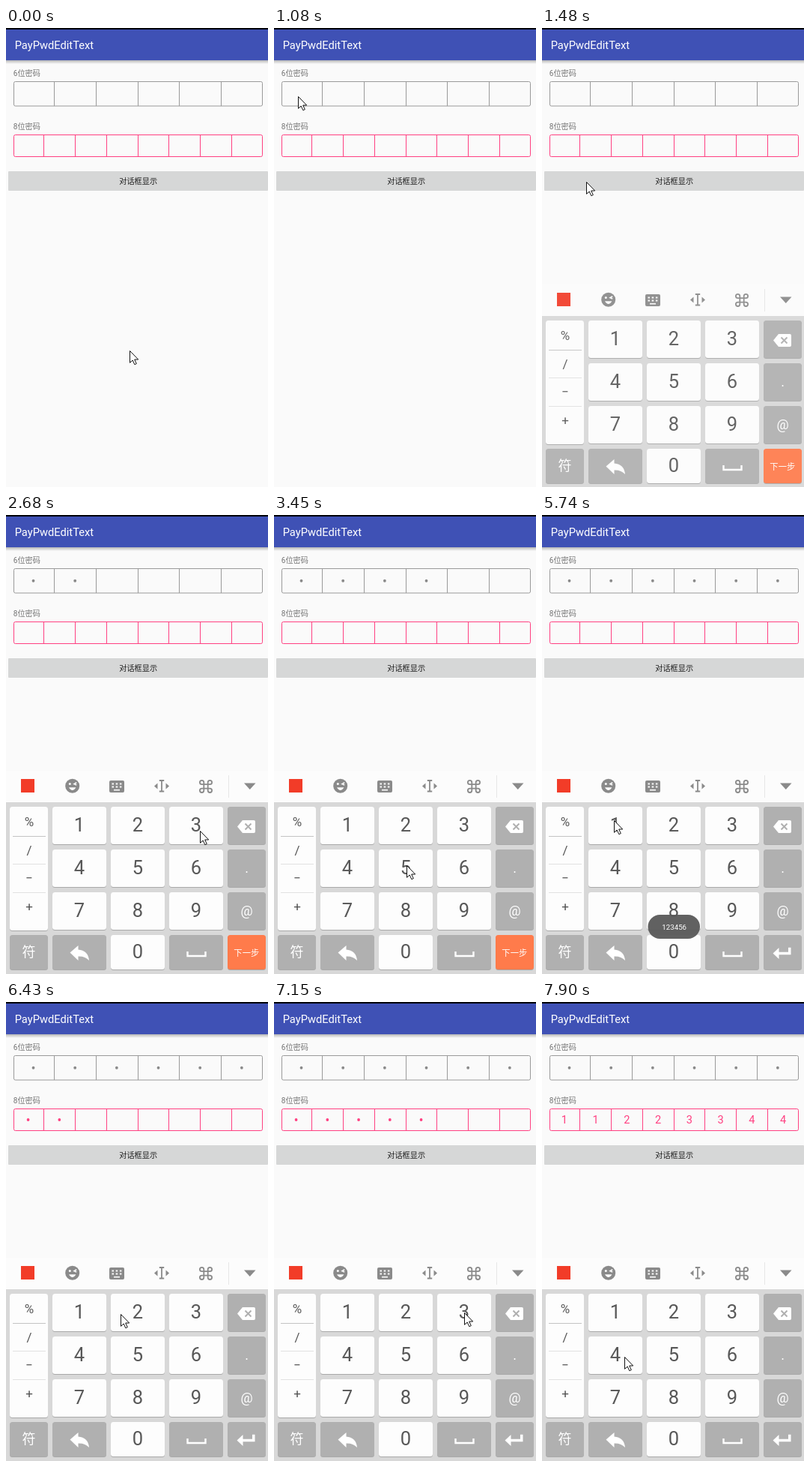
An HTML page that plays this animation: 350 px wide and 612 px high, repeating every 7990 ms.

```html
<!DOCTYPE html>
<html lang="zh">
<head>
<meta charset="utf-8">
<title>PayPwdEditText</title>
<style>
html, body { margin: 0; width: 100%; height: 100%; overflow: hidden; background: #fafafa; }
svg { display: block; width: 350px; height: 612px; }
text { font-family: Roboto, "Noto Sans CJK SC", "Noto Sans CJK", sans-serif; }
.mid { text-anchor: middle; }
.label { font-size: 10.2px; fill: #757575; }
.num { fill: #585858; }
.sym { font-size: 17px; fill: #555; }
.white { fill: #fff; }
.icon { fill: #8a8a8a; }
</style>
</head>
<body>
<svg viewBox="0 0 350 612">
  <defs>
    <linearGradient id="shade" x2="0" y2="1">
      <stop offset="0" stop-color="#000" stop-opacity=".27"/>
      <stop offset="1" stop-color="#000" stop-opacity="0"/>
    </linearGradient>
  </defs>
  <rect width="350" height="612" fill="#fafafa"/>
  <rect y="43" width="350" height="5" fill="url(#shade)"/>
  <rect width="350" height="43" fill="#3f51b5"/>
  <rect width="350" height="2" fill="#000"/>
  <text x="11.7" y="28" font-size="14.7" class="white">PayPwdEditText</text>
  <text x="9.7" y="64.3" class="label">6位密码</text>
  <text x="9.7" y="135.3" class="label">8位密码</text>
  <g id="fields"></g>
  <rect x="3" y="191" width="347" height="26" rx="1" fill="#d6d7d7"/>
  <text x="176.7" y="208" class="mid" font-size="10.2" fill="#1c1c1c">对话框显示</text>

  <g id="board">
    <rect y="341" width="350" height="42" fill="#fcfcfc"/>
    <rect y="383" width="350" height="229" fill="#d8d8d8"/>
    <rect x="20" y="352" width="18" height="18" fill="#f23c28"/>
    <g class="icon">
      <circle cx="88.7" cy="361.3" r="9.5"/>
      <path d="M138 356q0-2 2-2h16q2 0 2 2v12q0 2-2 2h-16q-2 0-2-2z"/>
      <path d="M202.500 357.500v8l-4.500-4zM213.500 357.500v8l4.500-4z"/>
      <path d="M318 357.500h15.500l-7.750 8.500z"/>
    </g>
    <g fill="none" stroke="#fcfcfc" stroke-width="1.6">
      <path d="M84 363.300q4.700 7.500 9.400 0z" fill="#fcfcfc" stroke="none"/>
      <circle cx="85.300" cy="358.600" r="1.500" fill="#fcfcfc" stroke="none"/>
      <path d="M94.200 356.800l-3.200 1.800 3.200 1.400"/>
      <path d="M141.500 358.500h13M141.500 362.500h13" stroke-width="2.200" stroke-dasharray="2.500 2.700"/>
      <path d="M144 366.700h8"/>
    </g>
    <g fill="none" stroke="#8a8a8a" stroke-width="1.8">
      <path d="M204.800 354h6.400M204.800 368.500h6.400M208 354v14.500"/>
      <path d="M264.300 359.200h5.400v5.400h-5.400zM264.300 359.200h-2.700a2.700 2.700 0 1 1 2.700-2.700zM269.700 359.200v-2.700a2.700 2.700 0 1 1 2.700 2.700zM269.700 364.600h2.700a2.700 2.700 0 1 1-2.700 2.700zM264.300 364.600v2.700a2.700 2.700 0 1 1-2.700-2.700z"/>
    </g>
    <path d="M297.500 347v30" stroke="#e6e6e6"/>
    <g id="keys"></g>
    <path d="M9 428.500h44" stroke="#c4c4c4"/>
    <path d="M9 465.500h44M9 503.500h44" stroke="#e2e2e2"/>
    <path d="M85.500 583.500l11-9.500v5.600q13 .8 14.500 14.400q-5-6-14.500-5.600v5.600z" fill="#fff"/>
    <path d="M242.500 582v6h24v-6" fill="none" stroke="#fff" stroke-width="2.400"/>
    <path d="M309 415.500l7-8.500h15q2 0 2 2v13q0 2-2 2h-15z" fill="#fff"/>
    <path d="M319.500 411.500l8 8m0-8l-8 8" stroke="#b0b0b0" stroke-width="2"/>
    <text id="next" x="321.300" y="587.700" class="mid white" font-size="11.300">下一步</text>
    <path id="enter" d="M308.500 584.500l8-7.500v5.800h12.500v-6h3.500v9.500h-16v5.700z" fill="#fff"/>
  </g>

  <g id="toast">
    <rect x="141.500" y="533" width="69.500" height="32" rx="16" fill="#595959" fill-opacity=".95"/>
    <text x="176.700" y="553" class="mid white" font-size="9.700">123456</text>
  </g>
  <path id="pointer" d="M.5.5V16.300l3.700-3.300 2.600 5.700 2.500-1.100-2.600-5.600h5z" fill="#fff" stroke="#111"/>
</svg>

<script>
const LOOP = 7990, STEP = 70;
const KEYBOARD_IN = 1390, SECOND_FIELD = 5260, REVEAL = 7900;
const GREY = '#b0b0b0', WHITE = '#fdfdfd', ORANGE = '#ff7b4b', PINK = '#ff4081';
const $ = id => document.getElementById(id);
const clamp = v => Math.max(0, Math.min(1, v));
const show = (el, alpha) => el.setAttribute('opacity', Number(alpha));

function add(parent, tag, attrs, text) {
  const el = document.createElementNS('http://www.w3.org/2000/svg', tag);
  for (const k in attrs) el.setAttribute(k, attrs[k]);
  if (text) el.textContent = text;
  return parent.appendChild(el);
}

// Password field: returns the dot and digit of each cell
function field(count, top, height, line, ink) {
  const g = $('fields'), w = 334 / count, mid = top + height / 2;
  add(g, 'rect', { x: 10.5, y: top, width: 332, height, rx: 2, fill: 'none', stroke: line });
  return Array.from({ length: count }, (_, i) => {
    if (i) add(g, 'path', { d: `M${Math.floor(9 + w * i) + .5} ${top}v${height}`, stroke: line });
    const x = 8.7 + w * (i + .5);
    return {
      dot: add(g, 'circle', { cx: x, cy: mid, r: 1.9, fill: ink }),
      digit: add(g, 'text', { x: x + .3, y: mid + 5.2, class: 'mid', 'font-size': 14.6, fill: ink })
    };
  });
}

const colX = col => col ? 78 * col - 16 : 5;
const rowY = row => 389 + 57 * row;

function key(col, row, fill, label, cls = 'white', size = 18, height = row === 3 ? 46 : 50) {
  const x = colX(col), y = rowY(row), width = col % 4 ? 72 : 51, rx = 3.5;
  add($('keys'), 'rect', { x, y: y + 1, width, height, rx, fill: '#a9a9a9' });
  const face = add($('keys'), 'rect', { x, y, width, height, rx, fill });
  if (label) add($('keys'), 'text', {
    x: x + width / 2, y: y + height / 2 + size * .33, class: 'mid ' + cls, 'font-size': size
  }, label);
  return face;
}

const place = n => [1 + (n - 1) % 3, Math.floor((n - 1) / 3)];
const faces = {};
for (let n = 1; n <= 9; n++) faces[n] = key(...place(n), WHITE, String(n), 'num', 25.5);
key(2, 3, WHITE, '0', 'num', 25.5);
key(0, 0, WHITE, '', '', 0, 165);
[...'%/−+'].forEach((s, i) => add($('keys'), 'text', { x: 31, y: 415 + 37.5 * i, class: 'mid sym' }, s));
['', '.', '@'].forEach((s, row) => key(4, row, GREY, s));
key(0, 3, GREY, '符');
key(1, 3, GREY);
key(3, 3, GREY);
const action = key(4, 3, GREY);

const six = field(6, 71.5, 32.5, '#9a9a9a', '#8a8a8a');
const eight = field(8, 142.5, 29, PINK, PINK);
eight.forEach((cell, i) => cell.digit.textContent = 1 + Math.floor(i / 2));

// A number key is tapped when the pointer leaves it, twice in the second field
const moves = [], taps = [];
let spot = { x: 165, y: 430 };

function go(start, end, to) {
  if (spot.key) {
    if (start > SECOND_FIELD) taps.push({ at: start - 2 * STEP, key: spot.key });
    taps.push({ at: start, key: spot.key });
  }
  moves.push({ start, end, from: spot, to });
  spot = to;
}

const at = (x, y) => ({ x, y });
function over(n, dx = 0, dy = 0) {
  const [col, row] = place(n);
  return { x: colX(col) + 36 + dx, y: rowY(row) + 25 + dy, key: n };
}

go(120, 180, at(152, 409));
go(450, 1140, at(31, 89));
go(KEYBOARD_IN, 2080, over(1, 12));
go(2200, 2320, over(2));
go(2530, 2680, over(3, 5, 7));
go(2760, 3120, over(4));
go(3300, 3450, over(5, 1, -4));
go(3610, 3950, over(6));
go(4200, 4720, at(130, 186));
go(4790, 5050, at(40, 160));
go(SECOND_FIELD, 5860, over(1));
go(6170, 6430, over(2, -23, 2));
go(6750, 6880, over(3));
go(7210, 7510, over(4, 12, 2));
go(7810, REVEAL, spot);

const sixTaps = taps.slice(0, 6), eightTaps = taps.slice(6);
const toastIn = sixTaps[5].at + STEP, toastOut = toastIn + 2000;

// Eased pointer travel, advancing in even steps
function pointerAt(t) {
  const m = moves.filter(m => t >= m.start).pop();
  if (!m) return moves[0].from;
  const n = Math.round((m.end - m.start) / STEP);
  const p = clamp((Math.floor((t - m.start) / (m.end - m.start) * n + 1e-6) + 1) / (n + 1));
  const k = 1 - (1 - p) ** 2.2;
  return at(m.from.x + (m.to.x - m.from.x) * k, m.from.y + (m.to.y - m.from.y) * k);
}

function draw(t) {
  const { x, y } = pointerAt(t);
  $('pointer').setAttribute('transform', `translate(${Math.round(x)} ${Math.round(y)})`);

  const left = clamp(1 - (t - KEYBOARD_IN) / 150);
  $('board').setAttribute('transform', `translate(0 ${Math.round(70 * left ** 4.5)})`);
  show($('board'), t >= KEYBOARD_IN && 1 - .2 * left);

  for (const n in faces) {
    const down = taps.some(tap => tap.key == n && t >= tap.at && t < tap.at + STEP);
    faces[n].setAttribute('fill', down ? '#dedede' : WHITE);
  }

  const plain = t >= REVEAL;
  six.forEach((cell, i) => show(cell.dot, t >= sixTaps[i].at));
  eight.forEach((cell, i) => {
    show(cell.dot, !plain && t >= eightTaps[i].at);
    show(cell.digit, plain);
  });

  const second = t >= SECOND_FIELD;
  action.setAttribute('fill', second ? GREY : ORANGE);
  show($('next'), !second);
  show($('enter'), second);
  show($('toast'), clamp(Math.min(t - toastIn, toastOut - t) / 120));
}

const start = performance.now();
function frame() {
  draw((performance.now() - start) % LOOP);
  requestAnimationFrame(frame);
}
frame();
</script>
</body>
</html>
```
